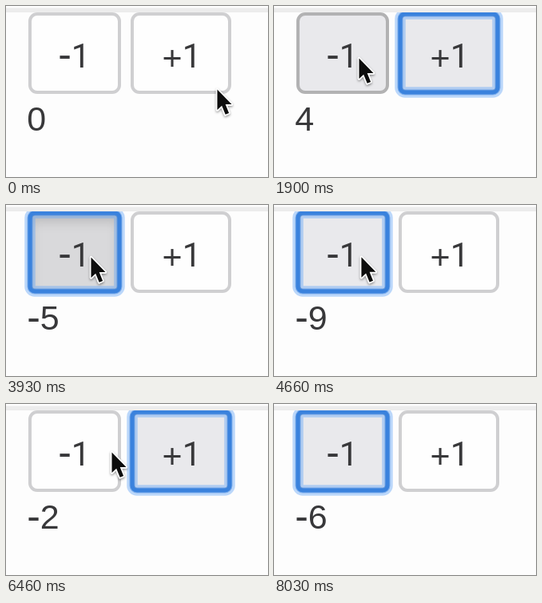
An HTML page for the animation above (8100 ms loop, 328 by 214 pixels).

```html
<!DOCTYPE html>
<html lang="en">
<head>
<meta charset="utf-8">
<title>Counter</title>
<style>
  html, body { margin: 0; width: 100%; height: 100%; overflow: hidden; background: #fdfdfd; }
  svg { display: block; width: 328px; height: 214px; }
  text { font: 43px "Liberation Sans", Arial, sans-serif; fill: #38383a; text-anchor: middle; }
  text.one { font: 42px Roboto, sans-serif; }
  text.dash { font-size: 50px; }
</style>
</head>
<body>
<svg id="stage" viewBox="0 0 328 214">
  <defs>
    <filter id="soft" x="-30%" y="-30%" width="160%" height="160%"><feGaussianBlur stdDeviation="7"/></filter>
    <filter id="drop" x="-50%" y="-50%" width="200%" height="200%">
      <feDropShadow dx="0" dy="1.5" stdDeviation="1.5" flood-opacity=".45"/>
    </filter>
    <clipPath id="page"><rect y="8" width="328" height="206"/></clipPath>
  </defs>
  <rect width="328" height="214" fill="#fdfdfd"/>
  <rect y="2.5" width="328" height="5.5" fill="#ececec"/>
  <g id="buttons" clip-path="url(#page)"></g>
  <g id="count"></g>
  <path id="cursor" d="M1.5 2.5v25.5l5.7 -5.3l4.5 11.1l4.4 -1.9l-4.4 -10.8h7.8Z" fill="#0a0a0a"
    stroke="#fff" stroke-width="3.2" stroke-linejoin="round" paint-order="stroke" filter="url(#drop)"/>
</svg>
<script>
const LOOP = 8100;
const MINUS = 0, PLUS = 1;
const HOVER_LAG = 60;
const $ = id => document.getElementById(id);

function add(parent, tag, attrs) {
  const el = document.createElementNS('http://www.w3.org/2000/svg', tag);
  for (const k in attrs) el.setAttribute(k, attrs[k]);
  parent.appendChild(el);
  return el;
}

// Places one character centred on x; "1" and "-" have their own styles.
const styles = { '1': 'one', '-': 'dash' };
function glyph(parent, ch, x, y) {
  add(parent, 'text', { x, y, class: styles[ch] || '' }).textContent = ch;
}

function makeButton(x, w) {
  const g = add($('buttons'), 'g', {});
  const box = { x: x + 2, y: 10, width: w - 4, height: 98, rx: 9 };
  const face = add(g, 'rect', { ...box, 'stroke-width': 4 });
  const clip = add(g, 'clipPath', { id: 'in' + x });
  add(clip, 'rect', box);
  // A blurred frame, moved down, makes the inner shadow.
  const inset = add(add(g, 'g', { 'clip-path': `url(#in${x})` }), 'rect',
    { x: x - 16, y: 1, width: w + 32, height: 134, fill: 'none', stroke: '#000',
      'stroke-opacity': .14, 'stroke-width': 40, filter: 'url(#soft)' });
  const ring = add(g, 'g', { fill: 'none' });
  const band = (stroke, opacity, width) => add(ring, 'rect',
    { ...box, rx: 6, stroke, 'stroke-opacity': opacity, 'stroke-width': width });
  band('#6aa9f7', .45, 13.5);
  band('#3a82dd', .5, 7);
  band('#3a82dd', 1, 5);
  return { x, w, face, inset, ring };
}

const buttons = [makeButton(28, 116), makeButton(156, 126)];
glyph($('buttons'), '-', 73.5, 77.3);
glyph($('buttons'), '1', 93.5, 76.5);
glyph($('buttons'), '+', 208, 79.5);
glyph($('buttons'), '1', 232.5, 76.5);

// Each click: button goes down, comes up, then the number follows.
const clicks = [];
function press(button, start, every, n, hold, lag) {
  for (let i = 0; i < n; i++) {
    const down = start + i * every;
    clicks.push({ button, down, up: down + hold, done: down + lag });
  }
}
press(PLUS, 460, 240, 4, 80, 120);
press(MINUS, 2000, 230, 2, 70, 100);
press(MINUS, 2430, 170, 2, 100, 130);
press(MINUS, 3000, 190, 4, 70, 100);
press(MINUS, 3760, 0, 1, 70, 70);
press(MINUS, 3930, 190, 4, 70, 100);
press(PLUS, 5260, 0, 1, 70, 100);
press(PLUS, 5430, 154, 6, 70, 100);
press(MINUS, 6650, 150, 3, 60, 90);
press(MINUS, 7100, 0, 1, 230, 260);

// Pointer route: time, x, y
const route = [
  [0, 263, 102], [29, 263, 102], [60, 250, 59],
  [1590, 250, 59], [1730, 182, 57], [1880, 105, 63],
  [4650, 105, 63], [4820, 150, 59], [4970, 181, 58],
  [6320, 181, 58], [6460, 131, 58], [6495, 131, 58], [6590, 105, 63],
  [7880, 105, 63], [7990, 190, 16], [LOOP, 190, 16]
];

function pointer(t) {
  const i = route.findIndex(p => p[0] > t);
  const [t0, x0, y0] = route[i - 1], [t1, x1, y1] = route[i];
  const k = (t - t0) / (t1 - t0);
  return { x: x0 + (x1 - x0) * k, y: y0 + (y1 - y0) * k };
}

let shown = null;
function showCount(n) {
  if (n === shown) return;
  shown = n;
  const g = $('count');
  g.textContent = '';
  if (n < 0) glyph(g, '-', 34.7, 157);
  glyph(g, String(Math.abs(n)), n < 0 ? 54.7 : 38.3, 156);
}

function draw(t) {
  const p = pointer(t);
  const seen = pointer(Math.max(0, t - HOVER_LAG));
  let focus = -1, down = -1, count = 0;
  for (const c of clicks) {
    if (t >= c.down) focus = c.button;
    if (t >= c.down && t < c.up) down = c.button;
    if (t >= c.done) count += c.button === PLUS ? 1 : -1;
  }
  buttons.forEach((b, i) => {
    const hover = t >= 460 && t < 8030 && seen.x >= b.x && seen.x < b.x + b.w;
    const active = down === i, focused = focus === i;
    b.face.setAttribute('fill', active ? '#d9d9db' : hover || focused ? '#e9e9ec' : '#fefefe');
    b.face.setAttribute('stroke', hover || focused ? '#b2b2b3' : '#cfcfd1');
    b.inset.style.display = active ? '' : 'none';
    b.ring.style.display = focused ? '' : 'none';
  });
  showCount(count);
  $('cursor').setAttribute('transform', `translate(${p.x} ${p.y})`);
  $('cursor').style.display = t < 8000 ? '' : 'none';
}

const start = performance.now();
function tick() {
  draw((performance.now() - start) % LOOP);
  requestAnimationFrame(tick);
}
tick();
</script>
</body>
</html>
```
